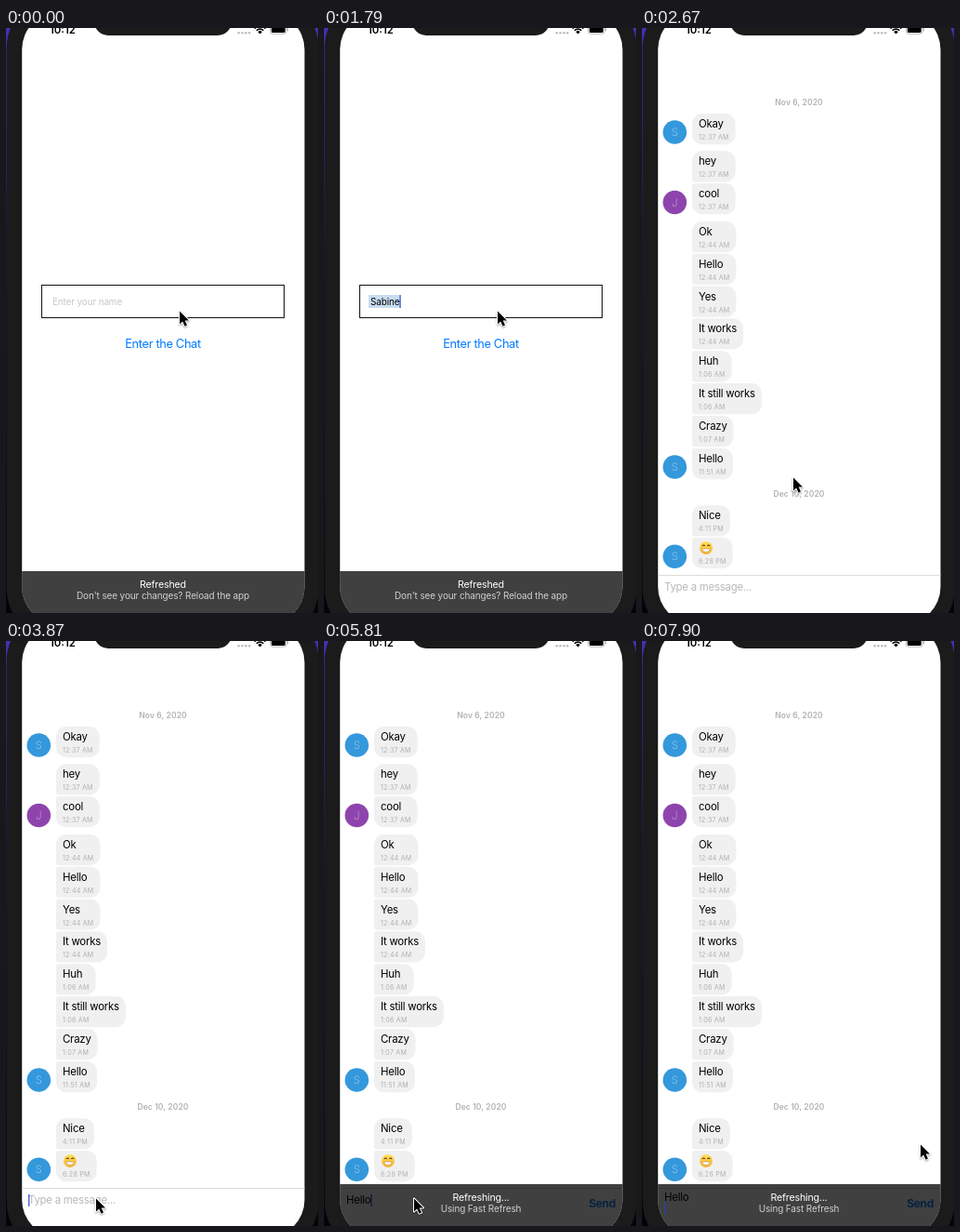
An HTML page with a canvas that plays this animation: 336 by 629 pixels, repeating every 8000 ms.

```html
<!DOCTYPE html>
<html lang="en">
<head>
<meta charset="utf-8">
<title>Chat app demo</title>
<style>
html, body { margin: 0; width: 336px; height: 629px; overflow: hidden; background: #000; }
canvas { display: block; width: 336px; height: 629px; }
</style>
</head>
<body>
<canvas id="stage"></canvas>
<script>
const W = 336, H = 629, LOOP = 8000, TICK = 148.9;
const canvas = document.getElementById('stage');
const ctx = canvas.getContext('2d');
const ratio = window.devicePixelRatio || 1;
canvas.width = W * ratio;
canvas.height = H * ratio;

const NAME = 'Sabine';
const BEZEL = '#1b1b1b', BLUE = '#007aff', CARET = '#3f63d8';

// size, weight, tracking in em
const STYLES = {
  clock: [11.4, 600, 0],
  field: [9.95, 400, -0.013],
  button: [12.8, 400, -0.026],
  body: [11.4, 400, -0.02],
  time: [7.1, 400, 0.03],
  date: [8.53, 600, 0.01],
  send: [12.1, 600, -0.03],
  title: [10.67, 400, -0.018],
  note: [9.95, 400, -0.01],
  avatar: [11.4, 200, 0]
};

// top, text, time, joined above, joined below
const BUBBLES = [
  [92, 'Okay', '12:37 AM', 0, 0],
  [132.3, 'hey', '12:37 AM', 0, 1],
  [167, 'cool', '12:37 AM', 1, 0],
  [208, 'Ok', '12:44 AM', 0, 1],
  [242.7, 'Hello', '12:44 AM', 1, 1],
  [277.5, 'Yes', '12:44 AM', 1, 1],
  [312.3, 'It works', '12:44 AM', 1, 1],
  [347.2, 'Huh', '1:06 AM', 1, 1],
  [382, 'It still works', '1:06 AM', 1, 1],
  [417, 'Crazy', '1:07 AM', 1, 1],
  [452, 'Hello', '11:51 AM', 1, 0],
  [513.2, 'Nice', '4:11 PM', 0, 1],
  [548, '', '6:28 PM', 1, 0]
];
const AVATARS = [[112, 'S', '#3498db'], [187.5, 'J', '#8e44ad'], [472, 'S', '#3498db'], [568.3, 'S', '#3498db']];

// tick, x, y of the pointer tip
const POINTER = [
  [0, 187, 305], [12, 187, 305], [14, 172, 336], [15, 171, 340], [18, 163, 484],
  [19, 153, 490], [24, 97, 600], [47, 97, 600], [48, 107, 597], [53, 300, 542]
];

function setStyle(name) {
  const [size, weight, track] = STYLES[name];
  ctx.font = `${weight} ${size}px Inter, Roboto, sans-serif`;
  ctx.letterSpacing = `${track * size}px`;
  return size;
}

function textWidth(name, str) {
  setStyle(name);
  return ctx.measureText(str).width;
}

function label(name, str, x, cy, color, align = 'left') {
  const size = setStyle(name);
  ctx.fillStyle = color;
  ctx.textAlign = align;
  ctx.fillText(str, x, cy + size * 0.36);
}

function rect(x, y, w, h, color) {
  ctx.fillStyle = color;
  ctx.fillRect(x, y, w, h);
}

function round(x, y, w, h, r, color) {
  ctx.beginPath();
  ctx.roundRect(x, y, w, h, r);
  ctx.fillStyle = color;
  ctx.fill();
}

function disc(x, y, r, color) {
  ctx.beginPath();
  ctx.arc(x, y, r, 0, Math.PI * 2);
  ctx.fillStyle = color;
  ctx.fill();
}

function arc(x, y, r, from, to, color, width) {
  ctx.beginPath();
  ctx.arc(x, y, r, from * Math.PI, to * Math.PI);
  ctx.strokeStyle = color;
  ctx.lineWidth = width;
  ctx.stroke();
}

function drawPhone() {
  const back = ctx.createLinearGradient(0, 0, 0, H);
  back.addColorStop(0, '#4032b4');
  back.addColorStop(0.23, '#2c2380');
  back.addColorStop(0.4, '#17143c');
  back.addColorStop(1, '#030308');
  rect(0, 0, W, H, back);
  round(0.7, -33, 336, 690, 54, BEZEL);
}

function drawStatus() {
  round(95, -30, 148, 38, 15, BEZEL);
  label('clock', '10:12', 47, 2.3, '#000');
  for (let i = 0; i < 4; i++) disc(250.7 + i * 3.8, 5.3, 1.3, '#bdbdbd');
  for (const r of [9, 6]) arc(273.5, 6.5, r - 0.7, 1.25, 1.75, '#000', 1.7);
  ctx.beginPath();
  ctx.moveTo(273.5, 6.5);
  ctx.arc(273.5, 6.5, 3.2, 1.25 * Math.PI, 1.75 * Math.PI);
  ctx.fillStyle = '#000';
  ctx.fill();
  ctx.beginPath();
  ctx.roundRect(284.5, -3, 17.5, 9.2, 2.6);
  ctx.strokeStyle = '#a6a6a6';
  ctx.lineWidth = 0.8;
  ctx.stroke();
  round(285.8, -1.7, 14.9, 6.7, 1.6, '#000');
  round(302.8, 0, 1.1, 3.2, 0.6, '#a6a6a6');
}

function typedName(n) {
  if (n < 2) return '';
  const count = n < 3 ? 1 : n < 5 ? 2 : n < 8 ? 3 : Math.min(n - 4, 6);
  return NAME.slice(0, count);
}

function drawLogin(n) {
  ctx.strokeStyle = '#111';
  ctx.lineWidth = 1;
  ctx.strokeRect(38.5, 276.5, 261, 35);
  const str = typedName(n);
  if (str) {
    const w = textWidth('field', str);
    if (n >= 10) rect(48, 287, w + 3, 14, '#c9dcf0');
    label('field', str, 50, 294, '#000');
    if (n !== 6 && n !== 7) rect(50 + w, 287, 1.4, 14, CARET);
  } else {
    label('field', 'Enter your name', 50, 294, '#c7c7cd');
  }
  ctx.globalAlpha = n === 14 ? 0.3 : 1;
  label('button', 'Enter the Chat', 169, 339.5, BLUE, 'center');
  ctx.globalAlpha = 1;
}

function drawGrin(x, y) {
  const face = ctx.createLinearGradient(0, y - 7, 0, y + 7);
  face.addColorStop(0, '#ffe05c');
  face.addColorStop(1, '#f7b331');
  disc(x, y, 7, face);
  for (const s of [-1, 1]) arc(x + s * 2.7, y - 1.6, 1.4, 1.1, 1.9, '#5b3511', 1.1);
  ctx.beginPath();
  ctx.moveTo(x - 4.4, y + 1);
  ctx.lineTo(x + 4.4, y + 1);
  ctx.quadraticCurveTo(x + 3.6, y + 4.6, x, y + 4.6);
  ctx.quadraticCurveTo(x - 3.6, y + 4.6, x - 4.4, y + 1);
  ctx.fillStyle = '#fff';
  ctx.fill();
  ctx.strokeStyle = '#a8743a';
  ctx.lineWidth = 0.5;
  ctx.stroke();
}

function drawMessages() {
  label('date', 'Nov 6, 2020', 169, 79.5, '#b2b2b2', 'center');
  label('date', 'Dec 10, 2020', 169, 501, '#b2b2b2', 'center');
  for (const [y, str, time, above, below] of BUBBLES) {
    const w = Math.max(textWidth('body', str), textWidth('time', time)) + 14;
    const big = 10.7, small = 2.1;
    round(54, y, w, 33.2, [above ? small : big, big, big, below ? small : big], '#f0f0f0');
    if (str) label('body', str, 61, y + 11, '#000');
    else drawGrin(69, y + 11);
    label('time', time, 61, y + 25.5, '#b0b0b0');
  }
  for (const [y, letter, color] of AVATARS) {
    disc(35.3, y, 12.8, color);
    label('avatar', letter, 35.3, y, 'rgba(255,255,255,.6)', 'center');
  }
}

function drawComposer(n) {
  rect(17, 588, 305, 1, '#dcdcdc');
  const count = n < 32 ? 0 : n < 35 ? 1 : n < 39 ? Math.min(n - 33, 4) : 5;
  const str = 'Hello'.slice(0, count);
  const wrapped = n >= 43;
  if (str) {
    label('body', str, 24, wrapped ? 598.3 : 601.3, '#000');
    label('send', 'Send', 285.3, 604.2, BLUE);
  } else {
    label('body', 'Type a message...', 24, 601.3, '#b8b8b8');
  }
  const on = (n >= 26 && n < 30) || (n >= 32 && n < 43);
  if (on) rect(24 + textWidth('body', str), 595, 1.4, 13, CARET);
}

function drawToast(title, note) {
  rect(17, 584, 305, 60, 'rgba(0,0,0,.75)');
  label('title', title, 169, 598, '#fff', 'center');
  label('note', note, 169, 610.3, '#d2d2d2', 'center');
}

function pointerAt(n) {
  let i = 0;
  while (i < POINTER.length - 2 && n >= POINTER[i + 1][0]) i++;
  const [t0, x0, y0] = POINTER[i], [t1, x1, y1] = POINTER[i + 1];
  const p = Math.min(1, (n - t0) / (t1 - t0));
  const e = p * p * (3 - 2 * p);
  return [x0 + (x1 - x0) * e, y0 + (y1 - y0) * e];
}

function drawPointer(n) {
  const [x, y] = pointerAt(n);
  ctx.save();
  ctx.translate(x, y - 0.6);
  ctx.beginPath();
  [[0, 0], [0, 14], [3.2, 11], [5.6, 16.3], [8, 15.2], [5.7, 10.1], [10, 10.1]]
    .forEach(([px, py]) => ctx.lineTo(px, py));
  ctx.closePath();
  ctx.lineJoin = 'round';
  ctx.shadowColor = 'rgba(0,0,0,.35)';
  ctx.shadowBlur = 2 * ratio;
  ctx.shadowOffsetY = ratio;
  ctx.strokeStyle = '#fff';
  ctx.lineWidth = 2;
  ctx.stroke();
  ctx.shadowColor = 'transparent';
  ctx.fillStyle = '#000';
  ctx.fill();
  ctx.restore();
}

function draw(t) {
  const n = Math.floor((t + 12) / TICK);
  const chat = n >= 15;
  ctx.setTransform(ratio, 0, 0, ratio, 0, 0);
  drawPhone();
  ctx.save();
  ctx.beginPath();
  ctx.roundRect(17.2, -17, 304.3, 658, 40);
  ctx.fillStyle = '#fff';
  ctx.fill();
  ctx.clip();
  if (chat) {
    if (n >= 16) drawMessages();
    drawComposer(n);
  } else {
    drawLogin(n);
  }
  const busy = (n >= 39 && n < 48) || n >= 53;
  if (busy) drawToast('Refreshing...', 'Using Fast Refresh');
  else if (!chat || n >= 48) drawToast('Refreshed', "Don't see your changes? Reload the app");
  if ((n >= 44 && n < 48) || n >= 51) rect(24.2, 604, 1.4, 12, '#2a43b4');
  ctx.restore();
  drawStatus();
  drawPointer(n);
}

const start = performance.now();
function loop() {
  draw((performance.now() - start) % LOOP);
  requestAnimationFrame(loop);
}
loop();
</script>
</body>
</html>
```
